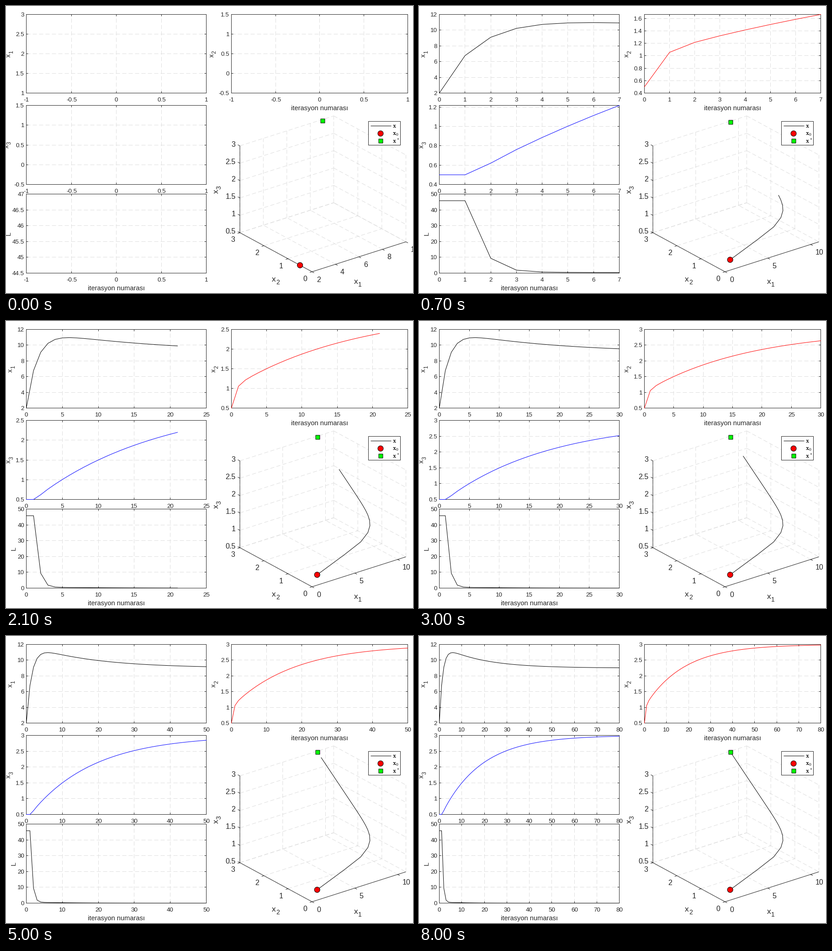
A matplotlib script that plays this animation: 891 by 628 pixels, repeating every 8.1 s.

```python
import math
import numpy as np
import matplotlib.pyplot as plt
from matplotlib.animation import FuncAnimation
from matplotlib.patches import Circle, Rectangle

W, H, DPI = 891, 628, 100
PX = 72 / DPI                      # points per pixel
STEPS = 80
INK, GRID = "#262626", "#dedede"
plt.rcParams["font.family"] = "Liberation Sans"

# Iterates: a fast transient followed by a slow geometric approach to (9, 3, 3)
k = np.arange(STEPS + 1)
gap = 1.991 * 0.9446 ** k + 0.509 * 0.125 ** k
x1 = 9 + 1.5 * gap - 10.3 * 0.5 ** k
x1[0] = 2
x2 = 3 - gap
x3 = 3 - np.minimum(2.5, gap * 4 / 3)
loss = np.minimum(45.8, 0.2 * gap ** 2 + 8.76 * 0.15 ** (k - 2.0))
loss[1] = loss[0]

# left, top, right, bottom, data, colour, label, subscript, has x label
PANELS = [
    (44.5, 18.5, 438.5, 190.5, x1, "k", "x", "1", False),
    (493.5, 18.5, 879.5, 190.5, x2, "r", "x", "2", True),
    (44.5, 217.5, 438.5, 390.5, x3, "b", "x", "3", False),
    (44.5, 411.5, 438.5, 584.5, loss, "k", "L", "", True),
]

fig = plt.figure(figsize=(W / DPI, H / DPI), dpi=DPI, facecolor="white")
ax = fig.add_axes([0, 0, 1, 1])


def crisp(v):
    """Centre of the pixel holding v."""
    return math.floor(v + 1e-6) + 0.5


def segments(segs, color=INK, dashed=False):
    xs, ys = [], []
    for (xa, ya), (xb, yb) in segs:
        xs += [xa, xb, np.nan]
        ys += [ya, yb, np.nan]
    ax.plot(xs, ys, color=color, lw=PX, solid_capstyle="butt", snap=False,
            ls=(0, (9, 5)) if dashed else "-")


def text(x, y, s, size, ha="center", **kw):
    ax.text(x, y, s, fontsize=size * PX, ha=ha, va="baseline", color=INK, **kw)


def subscripted(x, y, s, sub, size, upright=True):
    """Base letter starting at (x, y) with a lowered index after it."""
    adv, drop = size * 0.53, size * 0.36
    if upright:
        text(x, y, s, size, "left")
        text(x + adv, y + drop, sub, size * 0.8, "left")
    else:
        turn = dict(rotation=90, rotation_mode="anchor")
        text(x, y, s, size, "left", **turn)
        text(x + drop, y - adv, sub, size * 0.8, "left", **turn)


def ticks(lo, hi, step):
    first, last = math.ceil(lo / step - 1e-6), math.floor(hi / step + 1e-6)
    return [round(i * step, 6) for i in range(first, last + 1)]


def label_width(s, size):
    return size * sum({".": .278, "-": .333}.get(c, .556) for c in s)


def nice_range(lo, hi, max_ticks):
    """Tightest limits on multiples of a 1-2-5 step, as (low, high, step)."""
    single = lo == hi
    if single:
        lo, hi = lo - 1, hi + 1
    fits = []
    for step in (m * 10.0 ** e for e in (-2, -1, 0, 1) for m in (1, 2, 5)):
        first, last = math.floor(lo / step + 1e-6), math.ceil(hi / step - 1e-6)
        if last - first < max_ticks:
            fits.append((round((last - first) * step, 6), step, first * step, last * step))
    _, step, low, high = min(fits)
    # With slack at the bottom already, the top stays on the data
    if not single and lo - low > 0.05 * (hi - lo):
        high = hi
    return low, high, step


def draw_panel(n, left, top, right, bottom, data, color, name, sub, titled):
    shown = data[:n + 1]
    xlo, xhi, xstep = nice_range(0, n, 10)
    ylo, yhi, ystep = nice_range(shown.min(), shown.max(), 8)

    def px(v):
        return left + (v - xlo) / (xhi - xlo) * (right - left)

    def py(v):
        return bottom - (v - ylo) / (yhi - ylo) * (bottom - top)

    xt = [(crisp(px(v)), f"{v:g}") for v in ticks(xlo, xhi, xstep)]
    yt = [(crisp(py(v)), f"{v:g}") for v in ticks(ylo, yhi, ystep)]
    segments([((x, bottom), (x, top)) for x, _ in xt]
             + [((left, y), (right, y)) for y, _ in yt], GRID, True)
    marks = [((left, top), (right, top)), ((left, bottom), (right, bottom)),
             ((left, top), (left, bottom)), ((right, top), (right, bottom))]
    for x, s in xt:
        marks += [((x, bottom), (x, bottom - 4)), ((x, top), (x, top + 4))]
        text(x, bottom + 18.5, s, 13.33)
    for y, s in yt:
        marks += [((left, y), (left + 4, y)), ((right, y), (right - 4, y))]
        text(left - 4.5, y + 4.5, s, 13.33, "right")
    segments(marks)
    ax.plot(px(k[:n + 1]), py(shown), color=color, lw=PX, snap=False)

    wide = max(label_width(s, 13.33) for _, s in yt)
    middle = (top + bottom) / 2
    if sub:
        subscripted(left - wide - 16, middle + 7, name, sub, 14.67, upright=False)
    else:
        text(left - wide - 9, middle + 4, name, 14.67, "left",
             rotation=90, rotation_mode="anchor")
    if titled:
        text((left + right) / 2, bottom + 37.5, "iterasyon numarası", 14.67)


def start_mark(x, y):
    ax.add_patch(Circle((x, y), 6, fc="r", ec="k", lw=PX, zorder=4))


def goal_mark(x, y):
    ax.add_patch(Rectangle((crisp(x) - 4.5, crisp(y) - 4.5), 9, 9, fc="lime", ec="k",
                           lw=PX, snap=False, zorder=4))


def draw_space(n):
    lo, hi, step = (2, 10, 2) if n < 3 else (0, x1[:n + 1].max(), 5)

    def at(a, b, c):
        u, v, w = (a - lo) / (hi - lo), b / 3, (c - .5) / 2.5
        return (670 + 205.5 * u - 158 * v, 581.5 - 65.5 * u - 85.5 * v - 190 * w)

    t1, t2, t3 = ticks(lo, hi, step), ticks(0, 3, 1), ticks(.5, 3, .5)
    grid = []
    for a in t1:
        grid += [(at(a, 0, .5), at(a, 3, .5)), (at(a, 3, .5), at(a, 3, 3))]
    for b in t2:
        grid += [(at(lo, b, .5), at(hi, b, .5)), (at(hi, b, .5), at(hi, b, 3))]
    for c in t3:
        grid += [(at(lo, 3, c), at(hi, 3, c)), (at(hi, 3, c), at(hi, 0, c))]
    segments(grid, GRID, True)

    corner = at(lo, 0, .5)
    marks = [(corner, at(hi, 0, .5)), (corner, at(lo, 3, .5)),
             (at(lo, 3, .5), at(lo, 3, 3))]

    def tick(p, dx, dy):
        marks.append((p, (p[0] + dx, p[1] + dy)))
        return p

    for a in t1:
        x, y = tick(at(a, 0, .5), 4.5, 2.4)
        text(x + 10, y + 22, f"{a:g}", 16, "left")
    for b in t2:
        x, y = tick(at(lo, b, .5), -5, 1.6)
        text(x - 11, y + 20.5, f"{b:g}", 16, "right")
    for c in t3:
        x, y = tick(at(lo, 3, c), -4.5, -2.4)
        text(x - 9.5, y + 2.5, f"{c:g}", 16, "right")
    segments(marks)
    subscripted(582, 603, "x", "2", 17.3)
    subscripted(761.5, 608, "x", "1", 17.3)
    subscripted(464.5, 410, "x", "3", 17.3, upright=False)

    ax.plot(*at(x1[:n + 1], x2[:n + 1], x3[:n + 1]), color="k", lw=PX)
    start_mark(*at(x1[0], x2[0], x3[0]))
    goal_mark(*at(x1[-1], x2[-1], x3[-1]))


def draw_legend():
    ax.add_patch(Rectangle((793.5, 252.5), 70, 52, fc="white", ec=INK, lw=PX,
                           snap=False, zorder=3))
    ax.plot([799, 843], [262.5, 262.5], color="k", lw=PX, snap=False, zorder=4)
    start_mark(820, 279)
    goal_mark(820, 295)
    for y, s in ((266, "x"), (283, "x_0"), (300, "x^*")):
        ax.text(845.5, y, rf"$\mathbf{{{s}}}$", fontsize=13.5 * PX, va="baseline",
                math_fontfamily="cm", color="k", zorder=4)


def draw(n):
    ax.clear()
    ax.set_xlim(0, W)
    ax.set_ylim(H, 0)
    ax.axis("off")
    for panel in PANELS:
        draw_panel(n, *panel)
    draw_space(n)
    draw_legend()
    return []


anim = FuncAnimation(fig, draw, frames=STEPS + 1, init_func=lambda: draw(0),
                     interval=100, repeat=True, repeat_delay=0, blit=False)
plt.show()
```
